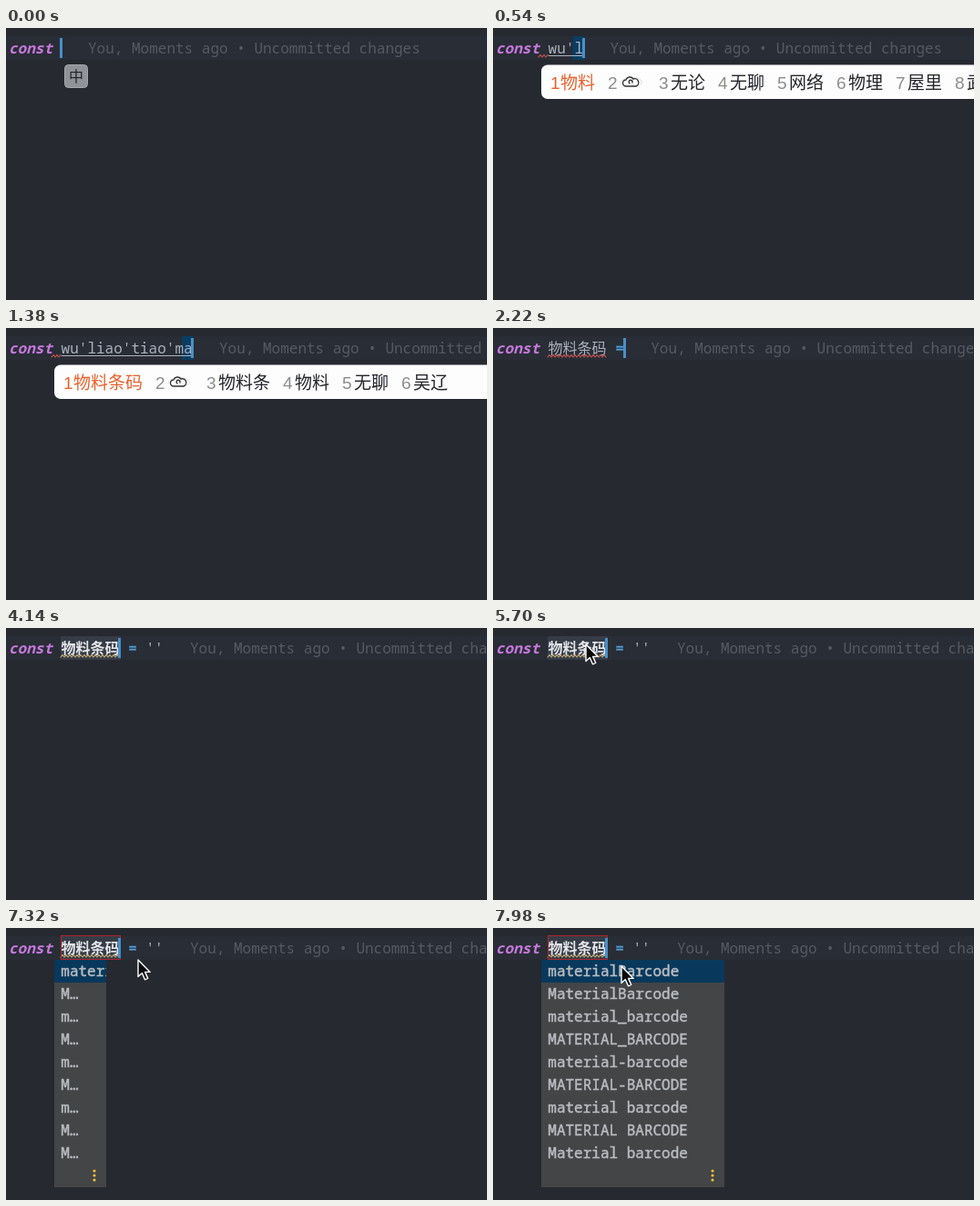
An HTML page that plays this animation: 528 px wide and 299 px high, repeating every 8000 ms.

```html
<!DOCTYPE html>
<html lang="zh">
<head>
<meta charset="utf-8">
<title>Rename a variable</title>
<style>
  html, body { margin: 0; width: 100%; height: 100%; overflow: hidden; background: #262930; }
  svg { display: block; }
  text { white-space: pre; }
  .code { font: 16px 'Noto Sans Mono', 'Noto Sans CJK SC', monospace; fill: #abb2bf; }
  .key { font-weight: 700; font-style: italic; fill: #c678dd; }
  .op { fill: #4f9bd6; stroke: #4f9bd6; stroke-width: .4; }
  .blame { fill: #565a64; }
  .picked { font-weight: 700; fill: #e4e6ea; }
  .item { fill: #b9bcc0; stroke: #b9bcc0; stroke-width: .45; }
  .menu { font: 14px 'Noto Sans CJK SC', 'Noto Sans', sans-serif; fill: #c0c0c0; }
  .short { font: 15px 'Noto Sans', 'DejaVu Sans', sans-serif; text-anchor: end; stroke: #c0c0c0; stroke-width: .25; }
  .lang { font-weight: 700; font-size: 15px; }
  .letter { font-weight: 700; font-style: italic; fill: #3d94d9; }
  .u { text-decoration: underline; }
  .num { font: 19px 'Liberation Sans', sans-serif; fill: #8c8c8c; }
  .cand { font: 500 19px 'Noto Sans CJK SC', sans-serif; fill: #232529; }
  .first { fill: #e8622c; }
  .line { fill: none; stroke-width: 1.4; stroke-linecap: round; stroke-linejoin: round; }
</style>
</head>
<body>
<svg id="stage" width="528" height="299" viewBox="0 0 528 299">
  <rect width="528" height="299" fill="#262930"/>
  <rect y="9" width="528" height="26" fill="#292d35"/>
  <text class="code key" x="3" y="28">const</text>
  <g id="editor"></g>
  <rect id="caret" y="11" width="3" height="22" fill="#4690cc"/>
  <g id="badge">
    <rect x="64.5" y="40.5" width="25" height="25" rx="4" fill="#909397" stroke="#a6a8ab"/>
    <text class="cand" x="69" y="59" style="font-size:16px">中</text>
  </g>
  <g id="ime"></g>
  <g id="menu"></g>
  <g id="list"></g>
  <path id="pointer" d="M0 0V18.5L4.3 14.6L7.5 21.8L10.7 20.4L7.6 13.4H13.2Z" fill="#080808" stroke="#fff" stroke-width="1.4" stroke-linejoin="round"/>
</svg>
<script>
const LOOP = 8000, CHAR = 9.6, START = 60.6, NAME = '物料条码';
const el = id => document.getElementById(id);
const show = (id, on) => el(id).setAttribute('visibility', on ? 'visible' : 'hidden');
const cache = {};
function fill(id, html) {
  if (cache[id] !== html) el(id).innerHTML = cache[id] = html;
}
const text = (cls, x, y, s) => `<text class="${cls}" x="${x}" y="${y}">${s}</text>`;
const rect = (x, y, w, h, color, more = '') =>
  `<rect x="${x}" y="${y}" width="${w}" height="${h}" fill="${color}" ${more}/>`;
const line = (d, color, more = '') => `<path class="line" d="${d}" stroke="${color}" ${more}/>`;
const at = (steps, t) => steps.filter(s => s[0] <= t).pop();

function squiggle(x, end, color) {
  let d = `M${x} 32`;
  for (let i = 1; x + i * 2 <= end; i++) d += `L${x + i * 2} ${i % 2 ? 29.5 : 32}`;
  return line(d, color, 'style="stroke-width:1.2"');
}

// Input method: time, pinyin so far, candidates (* is the cloud slot)
const typing = [
  [300, 'w', '我 为 无 问 完 玩 万 晚 王 外'],
  [420, 'wu', '无 五 物 误 屋 务 武 舞 午 雾'],
  [540, "wu'l", '物料 * 无论 无聊 网络 物理 屋里 武力'],
  [660, "wu'li", '物理 * 无力 武力 屋里 无理 五里'],
  [720, "wu'lia", '物料 * 无聊 五两 物量 无量 武林'],
  [780, "wu'liao", '物料 * 无聊 吴辽 无料 五聊 雾聊'],
  [900, "wu'liao't", '物料图 * 无聊图 无聊天 吴辽天 物料 无聊'],
  [1020, "wu'liao'ti", '物料提 * 无聊题 无聊提 物料题 物料 无聊'],
  [1080, "wu'liao'tia", '物料天 * 无聊天 物料填 吴辽天 物料 无聊'],
  [1200, "wu'liao'tiao", '物料条 * 无聊条 物料调 无聊跳 物料 无聊'],
  [1260, "wu'liao'tiao'm", '物料条码 * 物料条目 物料条 物料 无聊'],
  [1380, "wu'liao'tiao'ma", '物料条码 * 物料条 物料 无聊 吴辽']
];
const COMMIT = 1560, PICK = 3240;
const tails = [[0, ''], [1860, ' '], [2100, ' ='], [2340, ' = '], [2520, " = ''"]];

function candidates(words) {
  let x = 63, out = rect(53, 40.5, 500, 37.5, '#fdfdfe', 'rx="7"');
  words.split(' ').forEach((word, i) => {
    out += text(i ? 'num' : 'num first', x, 67, i + 1);
    x += i ? 13 : 11;
    if (word === '*') {
      out += line(`M${x + 1} 61C${x} 55 ${x + 18} 51 ${x + 24} 58C${x + 26} 63 ${x + 18} 65 ${x + 14} 64`, '#ddd', 'style="stroke-width:1"')
        + line(`M${x + 7} 64a3.5 3.5 0 0 1 0-7a4.5 4.5 0 0 1 8-1a4 4 0 0 1 3 8ZM${x + 14} 60a2 2 0 1 0-3 1`, '#333');
      x += 29;
    } else {
      out += text(i ? 'cand' : 'cand first', x, 67, word);
      x += word.length * 19;
    }
    x += 14;
  });
  return out;
}

const blame = end => text('code blame', end + 29.4, 28, 'You, Moments ago • Uncommitted changes');

function drawEditor(t) {
  const step = t < COMMIT && at(typing, t);
  let out = '', end = START, caret;
  if (t < COMMIT) {
    if (t >= 60) out += squiggle(50, 60, '#c4524e');
    if (step) {
      end += step[1].length * CHAR;
      out += rect(end - CHAR - 2, 9, CHAR + 3, 26, '#0a3d62')
        + text('code', START, 28, step[1])
        + rect(START, 30, end - START, 1, '#abb2bf');
    }
    caret = end;
  } else {
    const tail = at(tails, t)[1], picked = t >= PICK, right = START + 64;
    end = right + tail.length * CHAR;
    if (picked) out += rect(60, 9, 66, 26, '#363c46');
    out += text(picked ? 'code picked' : 'code', START, 28, NAME)
      + squiggle(60, 124, t < 2880 ? '#c4524e' : '#c0aa78')
      + text('code op', right, 28, tail.slice(0, 2))
      + text('code', right + 2 * CHAR, 28, tail.slice(2));
    caret = picked ? right : t >= 2520 ? end - CHAR : end;
    if (t >= 7260) out += rect(60.5, 8.5, 65, 26, 'none', 'stroke="#b3262d"');
  }
  fill('editor', out + blame(end));
  el('caret').setAttribute('x', Math.round(caret - 1.2));
  fill('ime', step ? candidates(step[2]) : '');
}

const blinks = [2880, PICK, 3720, 4140, 4440, 4740, 5220, 5580];
const caretOn = t => blinks.filter(b => b <= t).length % 2 === 0;

// Context menu: centre y, label, shortcut ('>' opens a submenu)
const items = [
  [13, '翻译', '⌃⌘U'], [36, '翻译并替换...', '⌃⌘O'], [70, '显示上下文操作', '⌥↵'],
  [104, '剪切(T)', '⌘X'], [127, '复制(C)', '⌘C'], [150, '粘贴(P)', '⌘V'],
  [173, '复制/粘贴特殊', '>'], [196, '列选择模式(M)', '⇧⌘8'],
  [230, '在文件中查找', ''], [253, '查找用法(U)', '⌥F7'], [276, '重构(R)', '>']
];
const lang = (y, letter) =>
  text('menu lang', 121, y + 3, '文') + text('menu letter', 132, y + 7, letter);
const icons = lang(13, 'A') + lang(36, 'R')
  + '<circle cx="132" cy="68" r="5" fill="#96999b"/>' + rect(129.5, 71, 5, 3, '#96999b') + rect(130, 75, 4, 2, '#96999b')
  + line('M132 60v1M126 62l1 1M138 62l-1 1M123.5 68h1.5M139 68h1.5', '#96999b')
  + line('M126 96.5L136 107M138.5 96.5L128 107', '#62aef0', 'style="stroke-width:2"')
  + '<g fill="none" stroke="#62aef0" stroke-width="1.6"><circle cx="126.5" cy="108" r="2.3"/><circle cx="137.5" cy="108" r="2.3"/></g>'
  + line('M124 131V118.5H135M128 122.5H139.5V135H128Z', '#e0cdb0')
  + rect(125, 142, 14, 15, 'none', 'rx="1" stroke="#f3b668" stroke-width="1.6"') + rect(128.5, 140, 7, 4.5, '#f3b668');

function menu(hover) {
  let out = rect(104, -5, 273, 310, '#3a3d40', 'stroke="#2c2f34"');
  if (hover) out += rect(104.5, 25, 272, 23, '#0b3b5e');
  for (const y of [53, 87, 213, 293]) out += rect(118, y, 243, 1, '#55585a');
  for (const [y, label, key] of items) {
    out += text('menu', 148, y + 5, label.replace(/\((.)\)/, '(<tspan class="u">$1</tspan>)'));
    out += key === '>' ? line(`M351 ${y - 3}l3 3.5l-3 3.5`, '#4a9fe0') : text('menu short', 361, y + 5, key);
  }
  return out + icons;
}

const names = ['materialBarcode', 'MaterialBarcode', 'material_barcode', 'MATERIAL_BARCODE',
  'material-barcode', 'MATERIAL-BARCODE', 'material barcode', 'MATERIAL BARCODE', 'Material barcode'];

function list(width) {
  const narrow = width < 100;
  let out = rect(0, 0, width, 250, '#434546') + rect(0, 0, width, 25, '#08395c');
  names.forEach((name, i) => {
    out += text('code item', 7.3, 18 + i * 25, narrow && i ? name[0] + '…' : name);
  });
  for (const y of [232, 237, 242]) out += `<circle cx="${width - 13}" cy="${y}" r="1.6" fill="#f2c037"/>`;
  return `<svg x="53" y="35" width="${width}" height="250">${out}</svg>`;
}

const track = [[5580, 388, 33], [5700, 102, 18], [5880, 102, 18], [6120, 105, 20], [6660, 105, 20],
  [6900, 145, 38], [7200, 145, 38], [7260, 145, 35], [7800, 145, 35], [7860, 132, 41], [7980, 141, 42], [LOOP, 141, 42]];

function drawPointer(t) {
  show('pointer', t >= 5580);
  if (t < 5580) return;
  const i = track.findIndex(p => p[0] > t);
  const [a, b] = [track[i - 1], track[i]], k = (t - a[0]) / (b[0] - a[0]);
  const mix = n => a[n] + (b[n] - a[n]) * k;
  el('pointer').setAttribute('transform', `translate(${mix(1)} ${mix(2)})`);
}

function draw(t) {
  drawEditor(t);
  show('caret', caretOn(t));
  show('badge', t < 300);
  fill('menu', t >= 6180 && t < 7200 ? menu(t >= 6780) : '');
  fill('list', t >= 7260 ? list(t < 7380 ? 57 : 201) : '');
  drawPointer(t);
}

const origin = performance.now();
function tick() {
  draw((performance.now() - origin) % LOOP);
  requestAnimationFrame(tick);
}
draw(0);
requestAnimationFrame(tick);
</script>
</body>
</html>
```
